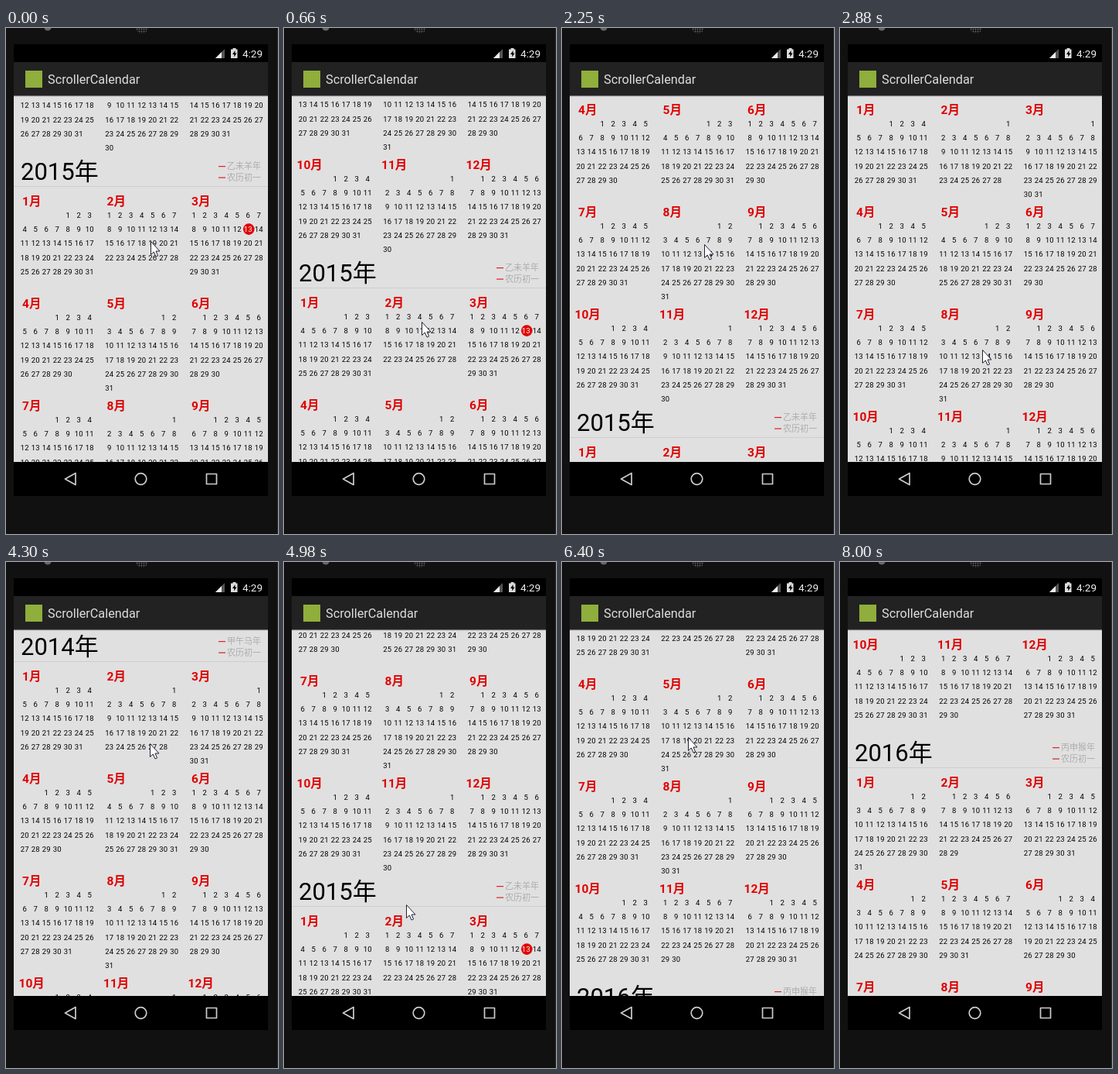
Recreate the animation shown at these times as an HTML page. Size 352 px wide and 653 px high, loop 8.43 s.

```html
<!DOCTYPE html>
<html lang="zh">
<head>
<meta charset="utf-8">
<title>ScrollerCalendar</title>
<style>
  html, body { margin: 0; width: 100%; height: 100%; overflow: hidden; background: #111; }
  svg { display: block; }
  text { font-family: Roboto, "Noto Sans CJK SC", "Noto Sans CJK", sans-serif; }
  .day { font-size: 9.5px; text-anchor: middle; }
  .month { font-size: 15.5px; font-weight: 700; text-anchor: middle; fill: #e00000; }
  .year { font-size: 31px; }
  .note { font-size: 11px; fill: #adadad; }
  .today { fill: #fff; }
</style>
</head>
<body>
<svg width="352" height="653" viewBox="0 0 352 653">
  <defs>
    <pattern id="holes" width="3" height="3" patternUnits="userSpaceOnUse">
      <circle cx="1.5" cy="1.5" r=".9" fill="#666"/>
    </pattern>
  </defs>
  <rect width="352" height="653" fill="#111"/>
  <rect x="351" width="1" height="653" fill="#2c2c2c"/>
  <circle cx="54" cy="-1" r="4.5" fill="#666"/>
  <circle cx="176" cy="-1" r="8" fill="url(#holes)"/>

  <rect x="10" y="21" width="329" height="583"/>
  <path d="M283 27V39H271Z" fill="#555"/>
  <path d="M279 31V39H271Z" fill="#eee"/>
  <path d="M293.5 26h4v1.5h2V39h-8.500V27.500h2.500Z" fill="#ddd"/>
  <path d="M296.500 29l-3.500 5h2.200v3.500l3.300-5h-2Z"/>
  <text x="306" y="37.500" font-size="13.500" fill="#eee">4:29</text>

  <rect x="10" y="44" width="329" height="43" fill="#222"/>
  <rect x="25" y="55" width="22" height="22" fill="#8fae3c"/>
  <text x="54" y="72" font-size="16.250" fill="#ddd">ScrollerCalendar</text>

  <svg x="10" y="87" width="329" height="473" viewBox="10 87 329 473">
    <rect x="10" y="87" width="329" height="473" fill="#e0e0e0"/>
    <g id="list"></g>
    <rect x="10" y="87" width="329" height="1" fill="#777077"/>
    <rect x="10" y="88" width="329" height="1" fill="#d2cdd2"/>
  </svg>

  <g fill="none" stroke="#ccc" stroke-width="1.700" stroke-linejoin="round">
    <path d="M76.500 582L90 574.500V589.500Z"/>
    <circle cx="174.500" cy="582" r="7.300"/>
    <rect x="259.500" y="575.500" width="13" height="13"/>
  </g>
  <path id="cursor" d="M.5.5V17.500L4.300 14L7 20L9.600 18.900L7 13H12Z"
        fill="#fff" stroke="#223" stroke-linejoin="round"/>
</svg>

<script>
const LOOP = 8430;
const YEAR_H = 574, ROW_H = 132, COL_W = 109.5, WEEK_H = 18.2, DAY_W = 14;
const list = document.getElementById('list');
const cursor = document.getElementById('cursor');

function add(tag, attrs, text) {
  const el = document.createElementNS('http://www.w3.org/2000/svg', tag);
  for (const k in attrs) el.setAttribute(k, attrs[k]);
  if (text !== undefined) el.textContent = text;
  list.append(el);
}

const label = (cls, x, y, text) => add('text', { class: cls, x, y }, text);

function addMonth(year, month, top) {
  const left = 24 + (month % 3) * COL_W;
  const y = top + Math.floor(month / 3) * ROW_H;
  const first = new Date(year, month, 1).getDay();
  const days = new Date(year, month + 1, 0).getDate();
  label('month', left + 9.2, y + 6, month + 1 + '月');
  for (let d = 1; d <= days; d++) {
    const cell = first + d - 1;
    const x = left + (cell % 7) * DAY_W + .2;
    const base = y + 22 + Math.floor(cell / 7) * WEEK_H;
    const today = year === 2015 && month === 2 && d === 13;
    if (today) add('circle', { cx: x + 1, cy: base - 3.6, r: 7.3, fill: '#e00000' });
    label(today ? 'day today' : 'day', x, base.toFixed(1), d);
  }
}

// Vertical zero is the first month row of 2015.
function addYear(year, name) {
  const top = (year - 2015) * YEAR_H;
  label('year', 19, top - 27, year + '年');
  [name, '农历初一'].forEach((text, i) => {
    const y = top - 45 + i * 14.5;
    add('rect', { x: 275, y, width: 9, height: 1.2, fill: '#e02020' });
    label('note', 286, y + 4, text);
  });
  add('rect', { x: 10, y: top - 19, width: 329, height: 1, fill: '#cecece' });
  for (let m = 0; m < 12; m++) addMonth(year, m, top);
}

['甲午马年', '乙未羊年', '丙申猴年'].forEach((name, i) => addYear(2014 + i, name));

// The screen refreshes in even steps, with a rest between the two halves.
const HALF = 28, LAST = 58;
const stepAt = t => t < 4000
  ? Math.min(HALF, Math.floor(t / 132 + .2))
  : Math.min(LAST, HALF + 1 + Math.floor((t - 4000) / 137.9));

// Step, list offset, pointer x, pointer y.
const keys = [
  [0, 223, 187, 275],
  [11, 511, 168, 503],
  [16, 520, 184, 252],
  [22, 679, 184, 415],
  [HALF, 724, 187, 238],
  [31, 721, 186, 234],
  [36, 463, 158, 442],
  [46, 25, 163, 226],
  [LAST, -290, 170, 640]
];

function pose(step) {
  const i = Math.max(1, keys.findIndex(k => k[0] >= step));
  const a = keys[i - 1], b = keys[i];
  const p = (step - a[0]) / (b[0] - a[0]);
  return a.map((v, j) => Math.round(v + (b[j] - v) * p));
}

function draw() {
  const step = stepAt(performance.now() % LOOP);
  const [, offset, x, y] = pose(step);
  list.setAttribute('transform', `translate(0 ${offset})`);
  cursor.setAttribute('transform', `translate(${x} ${y})`);
  cursor.setAttribute('visibility', step < LAST ? 'visible' : 'hidden');
  requestAnimationFrame(draw);
}
draw();
</script>
</body>
</html>
```
